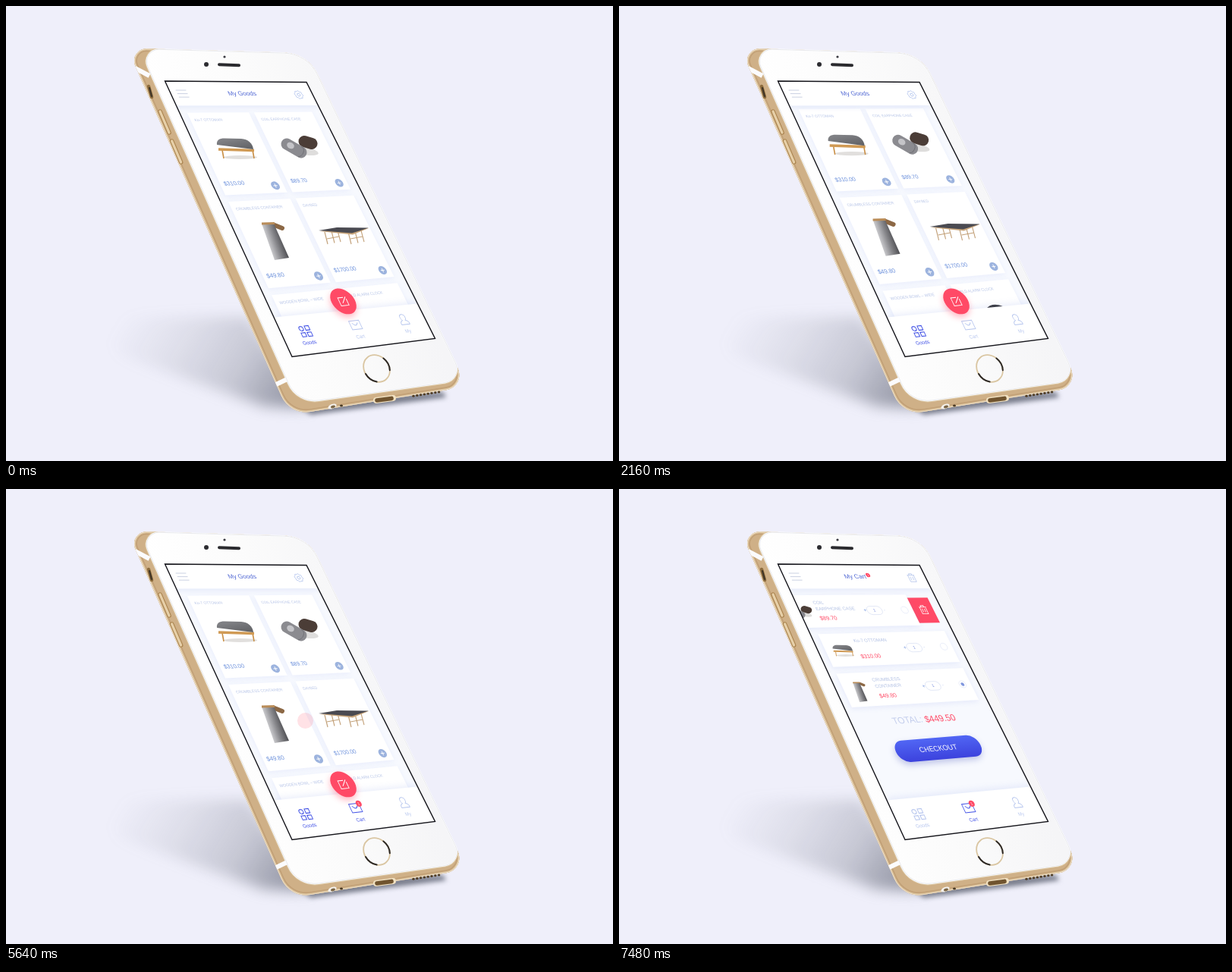
These frames come from a looping animation (800 by 600 pixels, 8000 ms). An HTML page with a canvas:

```html
<!DOCTYPE html>
<html lang="en">
<head>
<meta charset="utf-8">
<title>Shop app</title>
<style>
html, body { margin: 0; width: 100%; height: 100%; overflow: hidden; background: #efeffa; }
canvas { display: block; }
</style>
</head>
<body>
<canvas id="stage" width="800" height="600"></canvas>
<script>
const LOOP = 8000;
const main = document.getElementById('stage').getContext('2d');
let ctx = main;

const BLUE = '#4656e6', PALE = '#b7c6ee', PRICE = '#6a8fdb', PINK = '#ff4a66';
const FONT = '"Liberation Sans", Arial, sans-serif';

// ---- perspective: unit square -> phone screen ----
const corners = [[209.5, 99], [396, 100.5], [565.5, 438.5], [377, 462.5]];
const H = (() => {
  const [[x0, y0], [x1, y1], [x2, y2], [x3, y3]] = corners;
  const dx1 = x1 - x2, dx2 = x3 - x2, sx = x0 - x1 + x2 - x3;
  const dy1 = y1 - y2, dy2 = y3 - y2, sy = y0 - y1 + y2 - y3;
  const det = dx1 * dy2 - dx2 * dy1;
  const g = (sx * dy2 - dx2 * sy) / det, h = (dx1 * sy - sx * dy1) / det;
  return { a: x1 - x0 + g * x1, b: x3 - x0 + h * x3, c: x0,
           d: y1 - y0 + g * y1, e: y3 - y0 + h * y3, f: y0, g, h };
})();

function project(u, v) {
  const w = 1 + H.g * u + H.h * v;
  return [(H.a * u + H.b * v + H.c) / w, (H.d * u + H.e * v + H.f) / w, w];
}

// local matrix at a screen point, in a 375 x 667 layout
function local(u, v) {
  const [x, y, w] = project(u, v);
  return new DOMMatrix([
    (H.a - H.g * x) / w / 375, (H.d - H.g * y) / w / 375,
    (H.b - H.h * x) / w / 667, (H.e - H.h * y) / w / 667, x, y]);
}

// ---- drawing helpers ----
const reset = () => ctx.setTransform(1, 0, 0, 1, 0, 0);
const at = (u, v) => ctx.setTransform(local(u, v));

function trace(points) {
  ctx.beginPath();
  points.forEach(p => ctx.lineTo(p[0], p[1]));
  ctx.closePath();
}
function poly(fill, ...points) { trace(points); ctx.fillStyle = fill; ctx.fill(); }
function quad(fill, u0, v0, u1, v1) {
  reset();
  poly(fill, project(u0, v0), project(u1, v0), project(u1, v1), project(u0, v1));
}
function roundPoly(points, radii) {
  const path = new Path2D(), n = points.length;
  path.moveTo((points[0][0] + points[n - 1][0]) / 2, (points[0][1] + points[n - 1][1]) / 2);
  points.forEach((p, i) => path.arcTo(...p, ...points[(i + 1) % n], radii[i]));
  path.closePath();
  return path;
}
function shadow(color, blur, y = 0) {
  ctx.shadowColor = color; ctx.shadowBlur = blur; ctx.shadowOffsetY = y;
}
const noShadow = () => shadow('transparent', 0);

function ellipse(fill, x, y, rx, ry = rx, rot = 0) {
  ctx.beginPath(); ctx.ellipse(x, y, rx, ry, rot, 0, 7); ctx.fillStyle = fill; ctx.fill();
}
function ring(color, width, x, y, rx, ry = rx, rot = 0, from = 0, to = 7) {
  ctx.beginPath(); ctx.ellipse(x, y, rx, ry, rot, from, to);
  ctx.strokeStyle = color; ctx.lineWidth = width; ctx.stroke();
}
function line(color, width, x0, y0, x1, y1, cap = 'butt') {
  ctx.beginPath(); ctx.moveTo(x0, y0); ctx.lineTo(x1, y1);
  ctx.lineCap = cap; ctx.strokeStyle = color; ctx.lineWidth = width; ctx.stroke();
}
const bar = (...args) => line(...args, 'round');
function outline(color, width, d) {
  ctx.lineCap = 'butt'; ctx.strokeStyle = color; ctx.lineWidth = width;
  ctx.stroke(new Path2D(d));
}
function text(str, u, v, size, color, align = 'left') {
  at(u, v);
  ctx.font = `${size}px ${FONT}`;
  ctx.textAlign = align; ctx.textBaseline = 'middle';
  ctx.fillStyle = color; ctx.fillText(str, 0, 0);
}
function ramp(x0, y0, x1, y1, ...stops) {
  const g = ctx.createLinearGradient(x0, y0, x1, y1);
  stops.forEach((c, i) => g.addColorStop(i / (stops.length - 1), c));
  return g;
}

// ---- timing ----
const part = (t, a, b) => Math.min(1, Math.max(0, (t - a) / (b - a)));
const smooth = p => p * p * (3 - 2 * p);
const easeOut = p => 1 - (1 - p) ** 3;
const mix = (a, b, p) => a + (b - a) * p;

// ---- phone ----
function drawPhone() {
  const body = roundPoly([[160, 55.5], [397.5, 62.5], [607, 502], [374, 539.5]], [16, 50, 20, 36]);
  const face = roundPoly([[176.5, 56.5], [397, 63], [603, 493], [384, 524]], [16, 50, 18, 38]);
  ctx.fillStyle = '#efeffa'; ctx.fillRect(0, 0, 800, 600);

  const gray = a => `rgba(108,112,128,${a})`;
  ctx.filter = 'blur(9px)';
  poly(ramp(160, 400, 375, 530, gray(0), gray(.12), gray(.3), gray(.7)),
    [125, 425], [160, 410], [318, 410], [400, 530], [340, 528], [150, 460]);
  ctx.filter = 'blur(3px)';
  poly(gray(.9), [374, 520], [402, 539], [580, 516], [576, 509]);
  ctx.filter = 'none';

  // metal side
  ctx.fillStyle = '#cfb087'; ctx.fill(body);
  ctx.save();
  ctx.clip(body);
  [['#c2a076', 8], ['#d9bf97', 4.5], ['#f0e4d0', 1.8]].forEach(([c, w]) => {
    ctx.strokeStyle = c; ctx.lineWidth = w; ctx.stroke(body);
  });
  ctx.strokeStyle = '#dcc7a3'; ctx.lineWidth = 4; ctx.stroke(face);
  line('#fbfbfd', 6, 170, 82, 189, 92);
  line('#fbfbfd', 6, 354, 500, 377, 489);
  ctx.restore();

  bar('#8d6c3d', 4.5, 188, 106, 192, 120);
  bar('#3f3426', 2.2, 189, 108, 192, 119);
  for (const y of [139, 178]) {
    const x = 203 + (y - 139) * .4;
    bar('#a9824d', 5.5, x, y, x + 12, y + 28);
    bar('#e6cfa8', 3.2, x, y, x + 12, y + 28);
  }

  ctx.fillStyle = ramp(250, 300, 500, 220, '#fff', '#fbfbfb', '#f5f5f7'); ctx.fill(face);
  ctx.strokeStyle = '#fff'; ctx.lineWidth = 2; ctx.stroke(face);
  ctx.strokeStyle = 'rgba(190,192,204,.5)'; ctx.lineWidth = .7; ctx.stroke(face);

  ellipse('#2c2c31', 264, 77, 3);
  ellipse('#3a3a40', 288, 67, 1.6);
  bar('#2a2a2e', 4, 281, 77.2, 307, 78.2);

  // home key
  ring('#dac6a2', 1.8, 488.5, 478, 19, 16, .85);
  for (const a of [-1.3, 1.3]) ring('#2d2926', 2, 488.5, 478, 19, 16, .85, a - .5, a + .5);

  // bottom edge
  ellipse('#f4f1ec', 430, 528, 6, 3, -.4);
  ellipse('#7b6646', 431, 528.5, 3, 1.8, -.3);
  ellipse('#4b3b26', 442, 527, 2, 1.5);
  bar('#f1e1c2', 8, 488, 520, 510, 517);
  bar('#70542f', 5.6, 489, 520, 508, 517.4);
  for (let i = 0; i < 8; i++) ellipse('#4f3c24', 537 + i * 4.8, 514.2 - i * .75, 1.7, 1.5);
}

// ---- products, drawn in stage pixels around a reference place ----
const COL = .458, ROW = .3345, CARD_U = .05, CARD_V = .123, CARD_W = .421, CARD_H = .311;

function ottoman() {
  ellipse('rgba(120,110,100,.22)', 309, 199.5, 22, 2.6);
  for (const x of [285, 325]) line('#c98f45', 1.6, x, 190, x + 2, 201);
  line('#d09a54', 3.6, 280, 189, 327, 190.5);
  ctx.fillStyle = ramp(300, 175, 303, 191, '#7f8084', '#626367');
  ctx.fill(new Path2D('M278 183C277 177 281 174.5 288 174.5L310 175C319 175.5 325 181 326 189Z'));
}
function earphone() {
  ellipse('rgba(90,85,80,.2)', 394, 191, 18, 5, .2);
  bar('#4b3d37', 15, 393, 178.5, 403, 181.5);
  bar('#8b8b90', 15, 370, 182, 389, 193);
  ellipse('#c4c4c8', 375, 184, 5, 4, .5);
  ring('#707076', 1, 387, 192, 5, 7, .5, -1.8, 1.2);
}
function flask() {
  bar('#8c6845', 6, 354, 289, 364, 293);
  poly(ramp(344, 311, 364, 304, '#d2d2d5', '#8a8a8e', '#4b4b4f'),
    [337, 287], [353, 287], [373, 332], [354, 335]);
  line('#b98c58', 3, 337, 287, 354, 286.5);
}
function table() {
  for (const x of [420, 451]) {
    for (const dx of [0, 9, 17]) line('#c2a078', 1.1, x + dx, 298 - dx / 9, x + dx + 4, 314 - dx / 6);
    line('#c2a078', 1, x + 3, 307, x + 19, 304);
  }
  poly('#c8a57b', [413, 297], [478, 293], [457, 301.5]);
  poly('#4a4a51', [412, 296], [436, 292], [478, 292.5], [456, 299.5]);
}
function bowl() {
  ellipse('rgba(80,60,40,.2)', 388, 378, 25, 3);
  ctx.fillStyle = ramp(355, 365, 414, 362, '#4f3422', '#80583b', '#684530', '#4a3020');
  ctx.fill(new Path2D('M356 353L405 352Q412 354 414 358L411 376Q385 381 360 376Z'));
  poly('#6b4a30', [355, 347], [401, 350], [397, 355], [362, 355]);
  ellipse('#a5835f', 378, 347.5, 23, 2.6, .06);
}
function clock() {
  ellipse('rgba(60,60,70,.18)', 482, 376, 15, 4);
  ellipse(ramp(455, 340, 495, 370, '#434346', '#262628'), 473, 355.5, 27, 18.5, .85);
  ellipse('#202022', 468, 348, 17, 12.5, .75);
  ring('#4e4e52', .7, 468, 348, 16, 11.5, .75);
  for (let i = 0; i < 3; i++) {
    const a = 1.2 + i * 2.2;
    line('#77777b', 1.1, 468, 348, 468 + 9 * Math.cos(a), 348 + 9 * Math.sin(a));
  }
}

const goods = [
  { name: 'Ko-7 OTTOMAN', price: '$310.00', draw: ottoman },
  { name: 'COIL EARPHONE CASE', price: '$89.70', draw: earphone },
  { name: 'CRUMBLESS CONTAINER', price: '$49.80', draw: flask },
  { name: 'DAYBED', price: '$1700.00', draw: table },
  { name: 'WOODEN BOWL – WIDE', price: '$249.00', draw: bowl, lift: .187 },
  { name: 'VELD ALARM CLOCK', price: '$89.00', draw: clock, lift: .187 },
];
goods.forEach((g, i) => {
  g.u = CARD_U + (i % 2) * COL;
  g.v = CARD_V + (i >> 1) * ROW;
  g.back = local(g.u + .21, g.v + .14 - (g.lift || 0)).inverse();
});
function picture(g, u, v, k = 1) {
  ctx.setTransform(local(u, v).scale(k).multiply(g.back));
  g.draw();
}

// ---- pages ----
function header(title, du) {
  at(.078 + du, .049);
  for (const y of [-9, 0, 9]) line('#c6cde0', 1.6, -13, y, 13, y);
  text(title, .488 + du, .049, 16.3, '#5269d4', 'center');
}

function drawGoods(du, scroll) {
  for (const g of goods) {
    const u = g.u + du, v = g.v - scroll;
    shadow('rgba(130,155,235,.12)', 7, 2);
    quad('#fff', u, v, u + CARD_W, v + CARD_H);
    noShadow();
    text(g.name, u + .027, v + .029, 9.4, '#b4c2e6');
    picture(g, u + .21, v + .14);
    text(g.price, u + .025, v + .27, 14, PRICE);
    at(u + .362, v + .284);
    ellipse('#9cb3de', 0, 0, 10.5);
    line('#fff', 1.8, -5, 0, 5, 0);
    line('#fff', 1.8, 0, -5, 0, 5);
  }
}

function drawGear(du) {
  at(.895 + du, .0525);
  ctx.beginPath();
  for (let i = 0; i <= 48; i++) {
    const a = i / 48 * Math.PI * 2, r = 10.3 + 1.1 * Math.sin(a * 8);
    ctx.lineTo(r * Math.cos(a), r * Math.sin(a));
  }
  ctx.strokeStyle = '#a9bdec'; ctx.lineWidth = 1.5; ctx.stroke();
  ring('#a9bdec', 1.5, 0, 0, 4);
}

function trash(color, width) {
  outline(color, width, 'M-10 -7H10M-4 -7V-11H4V-7M-8 -7V11H8V-7M-3 -3V7M3 -3V7');
}

const cart = [
  { g: goods[1], name: ['COIL', 'EARPHONE CASE'] },
  { g: goods[0], name: ['Ko-7 OTTOMAN'] },
  { g: goods[2], name: ['CRUMBLESS', 'CONTAINER'] },
];
function drawCart(du, swipe) {
  cart.forEach(({ g, name }, i) => {
    const v = .121 + i * .148, u = du - (i ? 0 : swipe * .153), mid = v + .062;
    if (!i && swipe) {
      quad(PINK, .765 + du, v + .013, .938 + du, v + .115);
      at(.865 + du, mid); trash('#fff', 1.7);
    }
    shadow('rgba(110,135,225,.14)', 7, 2);
    quad('#fff', .05 + u, v, .94 + u, v + .124);
    noShadow();
    picture(g, .163 + u, mid + .003, .54);
    name.forEach((s, n) => text(s, .266 + u, v + .03 + n * .024, 11.4, '#b0bfe3'));
    text(g.price, .265 + u, v + .09, 14, PINK);
    text('+', .597 + u, mid, 13, PRICE, 'center');
    text('-', .734 + u, mid, 12, PALE, 'center');
    at(.663 + u, mid);
    outline('#d5ddf2', 1.2, 'M-9 -11H9A11 11 0 0 1 9 11H-9A11 11 0 0 1 -9 -11Z');
    text('1', .663 + u, mid, 10, '#6a80d8', 'center');
    at(.879 + u, mid);
    ring('#dfe5f6', 1.2, 0, 0, 9);
    if (i === 2) ellipse('#8097de', 0, 0, 4.5);
  });
  text('TOTAL:', .274 + du, .6, 22, '#c3cdec');
  text('$449.50', .494 + du, .602, 22, PINK);
  at(.49 + du, .7075);
  shadow('rgba(60,75,180,.3)', 9, 4);
  ctx.beginPath(); ctx.roundRect(-111, -26, 222, 52, 26);
  ctx.fillStyle = ramp(0, -26, 0, 26, '#5166f4', '#3c42dd'); ctx.fill();
  noShadow();
  text('CHECKOUT', .49 + du, .708, 17.5, '#fff', 'center');
}

function drawTabs(goodsOn, cartOn, badge) {
  const a = goodsOn ? BLUE : PALE, b = cartOn ? BLUE : PALE;
  reset();
  shadow('rgba(120,145,225,.17)', 10, -2);
  poly('#fff', project(0, .866), project(1, .872), project(1, 1), project(0, 1));
  noShadow();
  at(.156, .923);
  ring(a, 1.9, -7, -6.5, 5);
  outline(a, 1.9, 'M3 -11.5H13V-2H3ZM-12 3H-2V12H-12ZM3 3H13V12H3Z');
  at(.501, .9215);
  outline(b, 1.8, 'M-13 -10H13V10H-13ZM-7 -5Q0 6 7 -5');
  at(.845, .923);
  outline(PALE, 1.8, 'M0 -13C9 -13 8 -2 4 1C10 3 12 6 11 11H-11C-12 6 -10 3 -4 1C-8 -2 -9 -13 0 -13Z');
  text('Goods', .15, .9625, 11.5, a, 'center');
  text('Cart', .497, .963, 11.5, b, 'center');
  text('My', .838, .9635, 11.5, PALE, 'center');
  if (badge) {
    at(.501, .9215);
    ctx.translate(13, -9); ctx.scale(badge, badge);
    ellipse(PINK, 0, 0, 7.2);
    ctx.font = `9px ${FONT}`; ctx.textAlign = 'center';
    ctx.fillStyle = '#fff'; ctx.fillText('1', 0, .5);
  }
}

function drawCompose(du) {
  at(.495 + du, .837);
  shadow('rgba(255,74,102,.4)', 8, 4);
  ellipse(PINK, 0, 0, 30.5);
  noShadow();
  outline('#fff', 1.7, 'M4 -9H-10V10H10V-5M-3 4L10 -10');
}

// a finger dot glides to its goal, then swells and fades
function touch(t, start, from, to) {
  if (t < start || t >= start + 480) return;
  const p = smooth(part(t, start, start + 300)), q = part(t, start + 300, start + 480);
  ctx.globalAlpha = mix(.16, .36, p) * (1 - q * .95);
  reset();
  ellipse(PINK, mix(from[0], to[0], p), mix(from[1], to[1], p), 10.5 + 10 * easeOut(q));
  ctx.globalAlpha = 1;
}

function flyingDot(t) {
  if (t < 4000 || t >= 4700) return;
  const s = smooth(part(t, 3960, 4680)), r = 1 - s;
  const curve = (a, b, c) => a * r * r + 2 * b * s * r + c * s * s;
  reset();
  ellipse('#8fa8d8', curve(355, 390.6, 463), curve(236, 182, 424), 5.5);
}

// ---- frame ----
const phone = document.createElement('canvas');
phone.width = 800; phone.height = 600;
ctx = phone.getContext('2d');
drawPhone();
ctx = main;

function draw(t) {
  const scroll = .263 * (easeOut(part(t, 800, 1280)) - smooth(part(t, 1680, 2240)));
  const slide = t < 6280 ? 0 : smooth(part(t, 6225, 6640));
  const swipe = smooth(part(t, 7080, 7480));
  reset();
  ctx.drawImage(phone, 0, 0);
  ctx.save();
  trace(corners); ctx.clip();
  quad('#f7f9fe', 0, 0, 1, 1);
  if (slide < 1) drawGoods(-slide, scroll);
  if (slide > 0) drawCart(1 - slide, swipe);

  shadow('rgba(120,145,225,.17)', 7, 2);
  quad('#fff', 0, 0, 1, .096);
  noShadow();
  if (slide < 1) { header('My Goods', -slide); drawGear(-slide); }
  if (slide > 0) {
    const du = 1 - slide;
    header('My Cart', du);
    at(.584 + du, .042); ellipse(PINK, 0, 0, 5.6);
    text('1', .584 + du, .0425, 7, '#fff', 'center');
    at(.895 + du, .0525); trash('#b3c3ec', 1.5);
  }
  drawTabs(t < 6000, t >= 4720, easeOut(part(t, 4640, 4840)));
  if (slide < 1) drawCompose(-slide);
  flyingDot(t);
  touch(t, 3360, [474, 280], [355, 236]);
  touch(t, 5640, [394.5, 305.5], [468, 428]);
  ctx.restore();

  reset();
  trace(corners);
  ctx.strokeStyle = '#14141a'; ctx.lineWidth = 1.4; ctx.stroke();
}

const began = performance.now();
function tick() {
  draw((performance.now() - began) % LOOP);
  requestAnimationFrame(tick);
}
draw(0);
requestAnimationFrame(tick);
</script>
</body>
</html>
```
